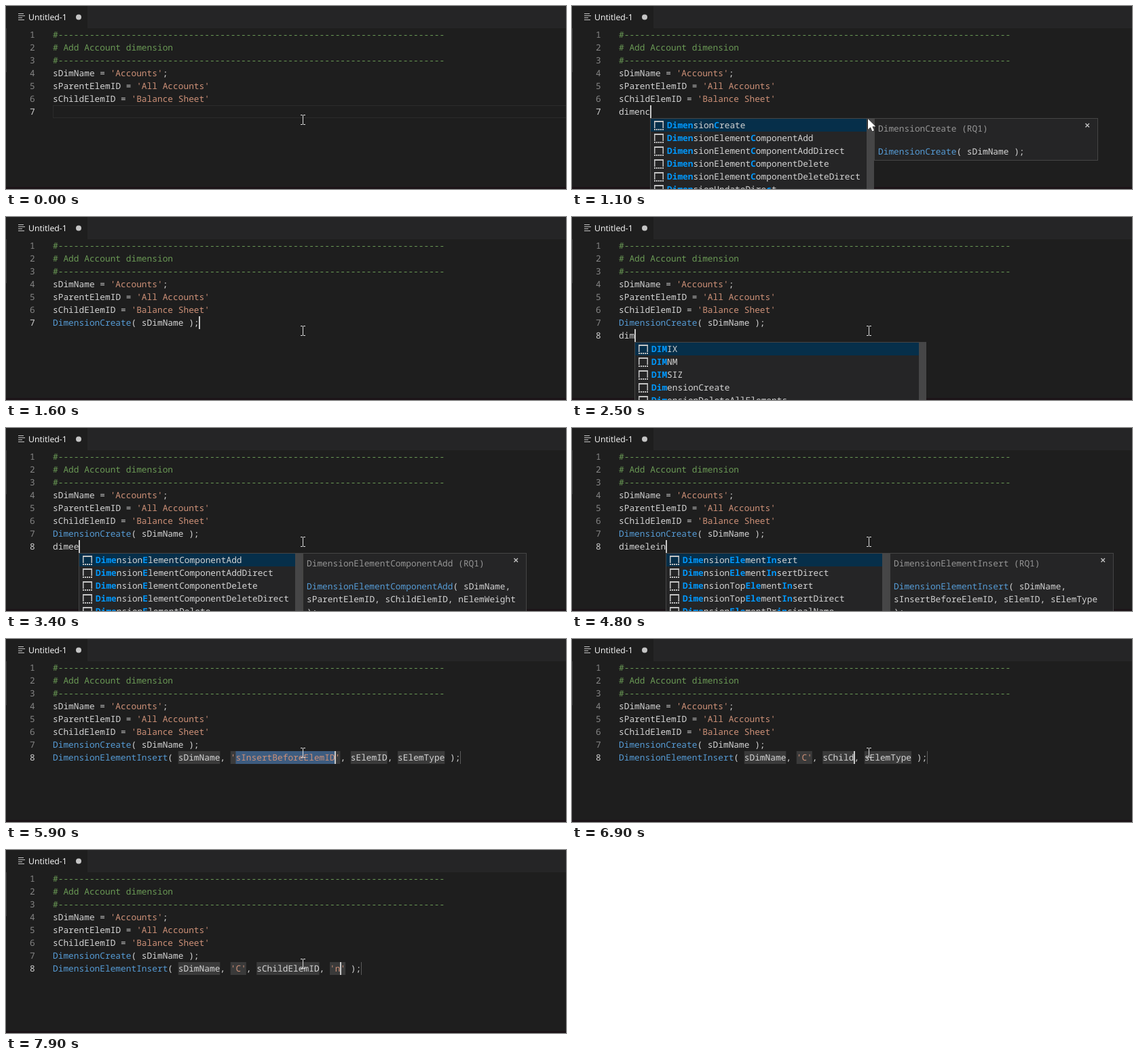
An HTML page with a canvas that plays this animation: 825 by 271 pixels, repeating every 8000 ms.

```html
<!DOCTYPE html>
<html>
<head>
<meta charset="utf-8">
<title>Editor completion</title>
<style>
html, body { margin: 0; width: 100%; height: 100%; overflow: hidden; background: #1e1e1e; }
canvas { display: block; }
</style>
</head>
<body>
<canvas width="825" height="271"></canvas>
<script>
const ctx = document.querySelector('canvas').getContext('2d');
const LOOP = 8000, LEFT = 69, TOP = 33, ROW = 19, CHAR = 7.698;
const MONO = '12.83px "Noto Sans Mono", monospace';
const TEXT = '#d4d4d4', PANEL = '#252526', BORDER = '#454545', MARK = '#3a3a3a';

const RULE = '#' + '-'.repeat(74);
const HEADER = [RULE, '# Add Account dimension', RULE, "sDimName = 'Accounts';",
  "sParentElemID = 'All Accounts'", "sChildElemID = 'Balance Sheet'"];
const CREATE = 'DimensionCreate( sDimName );';

const component = ['Add', 'AddDirect', 'Delete', 'DeleteDirect'].map(s => 'DimensionElementComponent' + s);
const dimension = ['DimensionCreate', 'DimensionDeleteAllElements', 'DimensionDestroy', ...component];
const LISTS = [
  [/^dimeelei/, ['DimensionElementInsert', 'DimensionElementInsertDirect', 'DimensionTopElementInsert',
    'DimensionTopElementInsertDirect', 'DimensionElementPrincipalName']],
  [/^dimee/, [...component, 'DimensionElementDelete']],
  [/^dimenc/, ['DimensionCreate', ...component, 'DimensionUpdateDirect']],
  [/^dime/, dimension],
  [/^di/, ['DIMIX', 'DIMNM', 'DIMSIZ', ...dimension]],
  [/^d/, ['DATE', 'DATES', 'DAY', 'DAYNO', 'DELET', 'DIMIX']]
];
const DETAILS = {
  DimensionCreate: [CREATE],
  DimensionElementComponentAdd: ['DimensionElementComponentAdd( sDimName,',
    'sParentElemID, sChildElemID, nElemWeight', ');'],
  DimensionElementInsert: ['DimensionElementInsert( sDimName,',
    'sInsertBeforeElemID, sElemID, sElemType', ');']
};

// Timeline: each step holds until the next one.
const steps = [];
const query = (at, row, text, wide) => steps.push({ at, row, text, wide, popup: text !== '' });
const insert = (at, args, active, selected) =>
  steps.push({ at, row: 8, name: 'DimensionElementInsert', args, active, selected });

query(0, 7, '');
[...'dimen'].forEach((c, i) => query(100 + i * 200, 7, 'dimen'.slice(0, i + 1)));
query(1000, 7, 'dimen', true);
['dimenc', 'dimencr', 'dimencre'].forEach((q, i) => query(1100 + i * 100, 7, q, true));
steps.push({ at: 1400, row: 7, name: 'DimensionCreate', args: ['sDimName'], active: 0, selected: true });
steps.push({ at: 1600, row: 7, text: CREATE });
query(1700, 8, '');
[...'dime'].forEach((c, i) => query(1900 + i * 250, 8, 'dime'.slice(0, i + 1)));
query(3100, 8, 'dimee');
query(3200, 8, 'dimee', true);
query(3500, 8, 'dimeel', true);
query(3600, 8, 'dimeele', true);
query(4600, 8, 'dimeelei', true);
query(4700, 8, 'dimeelein', true);
const D = 'sDimName', B = 'sInsertBeforeElemID', E = 'sElemID', T = 'sElemType', C = 'sChildElemID';
insert(5000, [D, B, E, T], 0, true);
insert(5300, [D, B, E, T], 1, true);
insert(5700, [D, `'${B}'`, E, T], 1, true);
insert(6100, [D, "'C'", E, T], 1);
insert(6300, [D, "'C'", E, T], 2, true);
for (let n = 1; n <= C.length; n++) insert(6300 + n * 100, [D, "'C'", C.slice(0, n), T], 2);
insert(7600, [D, "'C'", C, T], 3, true);
insert(7700, [D, "'C'", C, `'${T}'`], 3, true);
insert(7800, [D, "'C'", C, "'n'"], 3);

const rowTop = n => TOP + (n - 1) * ROW;
const colX = n => LEFT + n * CHAR;

function box(x, y, w, h, color) {
  ctx.fillStyle = color;
  ctx.fillRect(x, y, w, h);
}

function put(text, x, top, color) {
  ctx.fillStyle = color;
  ctx.fillText(text, x, top + 14);
}

function code(line, x, top) {
  for (const m of line.matchAll(/#.*|'.*?'|Dimension\w+|[^'D#]+|./g)) {
    const s = m[0];
    const color = s[0] === '#' ? '#6a9955' : s[0] === "'" ? '#ce9178' :
      s.startsWith('Dimension') ? '#569cd6' : TEXT;
    put(s, x + m.index * CHAR, top, color);
  }
}

function panel(x, y, w, h) {
  box(x, y, w, h, BORDER);
  box(x + 1, y + 1, w - 2, h - 2, PANEL);
}

function drawTab() {
  box(0, 0, 825, TOP, PANEL);
  box(0, 0, 120, TOP, '#1e1e1e');
  [8, 10, 6, 9].forEach((w, i) => box(18, 11 + i * 3, w, 1, '#c5c5c5'));
  ctx.font = '500 12.3px "Open Sans", sans-serif';
  put('Untitled-1', 33, 7, '#fff');
  ctx.fillStyle = '#c5c5c5';
  ctx.beginPath();
  ctx.arc(107, 16.5, 4, 0, 7);
  ctx.fill();
  box(0, TOP, 1, 65, '#3a3a3a');
  box(0, 268, 825, 3, '#1c1418');
  ctx.font = MONO;
}

function drawSnippet({ row, name, args, active, selected }) {
  const top = rowTop(row);
  let col = name.length + 2, caret;
  args.forEach((arg, i) => {
    box(colX(col), top, arg.length * CHAR, ROW, MARK);
    if (i === active) {
      const quote = arg[0] === "'" ? 1 : 0;
      caret = col + arg.length - quote;
      if (selected) box(colX(col + quote), top, (arg.length - 2 * quote) * CHAR, ROW, '#3d5c80');
    }
    col += arg.length + 2;
  });
  if (selected && args[active] === D) {
    box(LEFT, rowTop(4), 8 * CHAR, ROW, '#343a40');
    if (row === 8) box(colX(17), rowTop(7), 8 * CHAR, ROW, '#343a40');
  }
  const line = `${name}( ${args.join(', ')} );`;
  box(Math.floor(colX(line.length)), top, 1, ROW, '#5a5a5a');
  return [line, caret];
}

function drawIcon(x, y) {
  const color = '#c5c5c5';
  box(x, y, 14, 2, color);
  box(x, y, 1.5, 11, color);
  box(x + 12.5, y, 1.5, 11, color);
  for (let i = 0; i < 5; i++) box(x + i * 3, y + 12, 2, 2, color);
}

function drawItem(name, text, x, top) {
  let hit = 0;
  [...name].forEach((c, i) => {
    const match = c.toLowerCase() === text[hit];
    if (match) hit++;
    ctx.font = match ? 'bold ' + MONO : MONO;
    put(c, x + i * CHAR, top, match ? '#0097fb' : TEXT);
  });
  ctx.font = MONO;
}

function drawPopup({ row, text, wide }, t) {
  const x = Math.round(colX(text.length)), y = rowTop(row + 1);
  const width = wide ? 330 : 430;
  const items = LISTS.find(([pattern]) => pattern.test(text))[1];
  panel(x, y, width, 230);
  box(x + 1, y + 1, width - 2, ROW, '#062f4a');
  items.slice(0, 6).forEach((name, i) => {
    const top = y + 1 + i * ROW;
    drawIcon(x + 6, top + 3);
    drawItem(name, text, x + 25, top);
  });
  const faded = t >= 4400 && t < 4600 ? ROW : 0;
  box(x + width - 11, y + 1 + faded, 10, 228, '#464647');
  if (!wide) return;

  const lines = DETAILS[items[0]], dx = x + 330;
  panel(dx, y, 330, 44 + lines.length * ROW);
  put(items[0] + ' (RQ1)', dx + 6, y + 6, '#959595');
  lines.forEach((line, i) => code(line, dx + 6, y + 40 + i * ROW));
  ctx.strokeStyle = '#c5c5c5';
  ctx.lineWidth = 1.4;
  ctx.beginPath();
  ctx.moveTo(x + 641.5, y + 8);
  ctx.lineTo(x + 647, y + 13.5);
  ctx.moveTo(x + 647, y + 8);
  ctx.lineTo(x + 641.5, y + 13.5);
  ctx.stroke();
}

function drawPointer(arrow) {
  if (arrow) {
    const p = new Path2D('M436 167v16l3.7-3.5 2.6 6 2.8-1.2-2.6-5.8h5z');
    ctx.strokeStyle = '#000';
    ctx.lineWidth = 1;
    ctx.stroke(p);
    ctx.fillStyle = '#fff';
    ctx.fill(p);
  } else {
    box(437, 162, 1, 13, '#ddd');
    for (const y of [161, 175]) {
      box(434, y, 3, 1, '#ddd');
      box(438, y, 3, 1, '#ddd');
    }
  }
}

function draw(t) {
  const step = steps.findLast(s => s.at <= t);
  const { row } = step, top = rowTop(row);
  ctx.textRendering = 'geometricPrecision';
  box(0, 0, 825, 271, '#1e1e1e');
  drawTab();

  if (step.text === '') {
    box(LEFT, top, 760, ROW, '#2b2b2b');
    box(LEFT + 1, top + 1, 760, ROW - 2, '#1e1e1e');
  }
  const [line, caret] = step.args ? drawSnippet(step) : [step.text, step.text.length];
  const lines = row === 7 ? [...HEADER, line] : [...HEADER, CREATE, line];
  lines.forEach((s, i) => {
    put(i + 1, 35, rowTop(i + 1), i + 1 === row ? '#d0d0d0' : '#858585');
    code(s, LEFT, rowTop(i + 1));
  });
  const hidden = t < 100 || (t >= 4000 && t < 4600);
  if (!hidden) box(Math.floor(colX(caret)), top, 2, ROW, '#c8c8c8');
  if (step.popup) drawPopup(step, t);
  drawPointer(step.popup && row === 7);
}

const start = performance.now();
(function frame() {
  draw((performance.now() - start) % LOOP);
  requestAnimationFrame(frame);
})();
</script>
</body>
</html>
```
